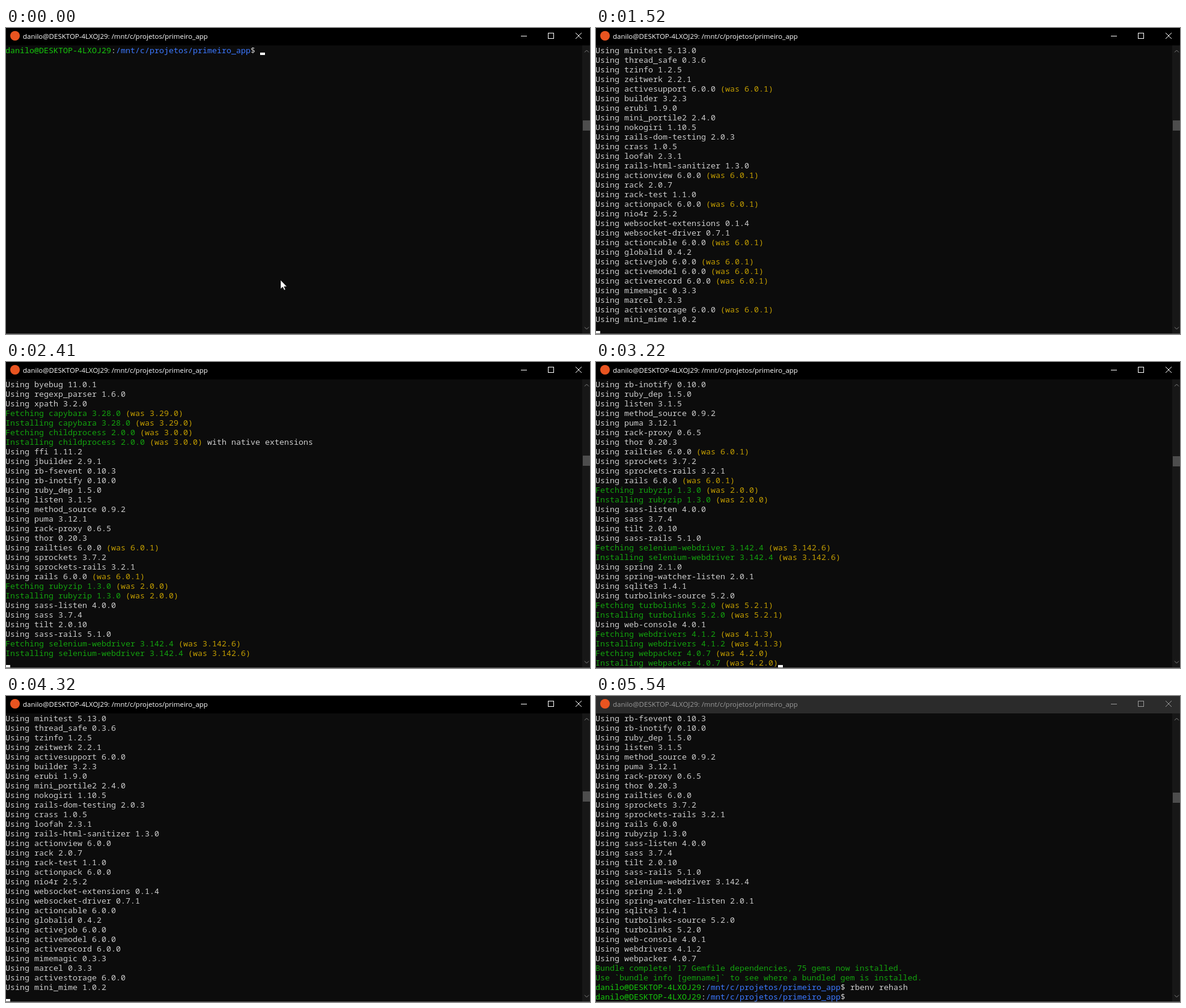
An HTML page with a canvas for the animation above (7630 ms loop, 972 by 510 pixels).

```html
<!DOCTYPE html>
<html lang="pt">
<head>
<meta charset="utf-8">
<title>Terminal</title>
<style>
html, body { margin: 0; width: 100%; height: 100%; overflow: hidden; background: #0c0c0c; }
canvas { display: block; }
</style>
</head>
<body>
<canvas id="stage" width="972" height="510"></canvas>
<script>
const ctx = document.getElementById('stage').getContext('2d', { alpha: false });
const LOOP = 7630, ROWS = 30, CELL_W = 8, CELL_H = 16, LEFT = -1, TOP = 29;
const LAST_STEP = 117;
const WHITE = '#cccccc', GREEN = '#13a10e', YELLOW = '#c19c00', LIME = '#16c60c', BLUE = '#3b78ff';
const HOST = 'danilo@DESKTOP-4LXOJ29', PATH = '/mnt/c/projetos/primeiro_app';

// name version [previous version] [+ when built natively]
const gems = `rake 13.0.1,concurrent-ruby 1.1.5,i18n 1.7.0,minitest 5.13.0,thread_safe 0.3.6,tzinfo 1.2.5,
zeitwerk 2.2.1,activesupport 6.0.0,builder 3.2.3,erubi 1.9.0,mini_portile2 2.4.0,nokogiri 1.10.5,
rails-dom-testing 2.0.3,crass 1.0.5,loofah 2.3.1,rails-html-sanitizer 1.3.0,actionview 6.0.0,rack 2.0.7,
rack-test 1.1.0,actionpack 6.0.0,nio4r 2.5.2,websocket-extensions 0.1.4,websocket-driver 0.7.1,
actioncable 6.0.0,globalid 0.4.2,activejob 6.0.0,activemodel 6.0.0,activerecord 6.0.0,mimemagic 0.3.3,
marcel 0.3.3,activestorage 6.0.0,mini_mime 1.0.2,mail 2.7.1,actionmailbox 6.0.0,actionmailer 6.0.0,
actiontext 6.0.0,public_suffix 4.0.1,addressable 2.7.0,bindex 0.8.1,msgpack 1.3.1,bootsnap 1.4.4 1.4.5 +,
bundler 2.0.2,byebug 11.0.1,regexp_parser 1.6.0,xpath 3.2.0,capybara 3.28.0 3.29.0,
childprocess 2.0.0 3.0.0 +,ffi 1.11.2,jbuilder 2.9.1,rb-fsevent 0.10.3,rb-inotify 0.10.0,ruby_dep 1.5.0,
listen 3.1.5,method_source 0.9.2,puma 3.12.1,rack-proxy 0.6.5,thor 0.20.3,railties 6.0.0,sprockets 3.7.2,
sprockets-rails 3.2.1,rails 6.0.0,rubyzip 1.3.0 2.0.0,sass-listen 4.0.0,sass 3.7.4,tilt 2.0.10,
sass-rails 5.1.0,selenium-webdriver 3.142.4 3.142.6,spring 2.1.0,spring-watcher-listen 2.0.1,
sqlite3 1.4.1,turbolinks-source 5.2.0,turbolinks 5.2.0 5.2.1,web-console 4.0.1,webdrivers 4.1.2 4.1.3,
webpacker 4.0.7 4.2.0`.split(/,\s*/).map(entry => entry.split(' '));

const prompt = command => [[LIME, HOST], [WHITE, ':'], [BLUE, PATH], [WHITE, '$ ' + command]];
const plain = (color, text) => [[color, text]];
const warning = [
  'The dependency tzinfo-data (>= 0) will be unused by any of the platforms Bundler is installing for. Bundler is installin',
  'g for ruby but the dependency is only for x86-mingw32, x86-mswin32, x64-mingw32, java. To add those platforms to the bun',
  'dle, run `bundle lock --add-platform x86-mingw32 x86-mswin32 x64-mingw32 java`.'
].map(text => plain(YELLOW, text));

function updateLines([name, version, previous, native]) {
  const was = v => [YELLOW, ` (was ${v})`];
  if (!previous) {
    const line = plain(WHITE, `Using ${name} ${version}`);
    return [version === '6.0.0' ? [...line, was('6.0.1')] : line];
  }
  const line = verb => [[GREEN, `${verb} ${name} ${version}`], was(previous)];
  const install = line('Installing');
  if (native) install.push([WHITE, ' with native extensions']);
  return [line('Fetching'), install];
}

const lines = [];
const metadata = 'Fetching gem metadata from https://rubygems.org/';
lines.push(prompt('bundle update'), ...warning,
  plain(WHITE, metadata + '.'.repeat(14)), plain(WHITE, metadata + '.'),
  plain(WHITE, 'Resolving dependencies.....'));
const update = lines.length;
lines.push(...gems.flatMap(updateLines), plain(GREEN, 'Bundle updated!'));
const second = lines.length;
lines.push(prompt('bundle install'), ...warning);
const install = lines.length;
lines.push(...gems.map(([name, version]) => plain(WHITE, `Using ${name} ${version}`)),
  plain(GREEN, 'Bundle complete! 17 Gemfile dependencies, 75 gems now installed.'),
  plain(GREEN, 'Use `bundle info [gemname]` to see where a bundled gem is installed.'));
const third = lines.length;
lines.push(prompt('rbenv rehash'), prompt(''));

// step, line, column of the terminal cursor
const keys = [
  [0, 0, 53], [13, 0, 66], [14, 1, 0], [15, 4, 0], [16, 4, 50], [20, 4, 62],
  [21, 5, 49], [22, 6, 0], [23, 6, 23], [27, 6, 27],
  [28, update, 0], [33, update + 40, 0], [34, update + 41, 0], [35, update + 41, 37], [37, update + 41, 37],
  [38, update + 46, 0], [39, update + 48, 0], [51, update + 72, 0], [67, update + 81, 0],
  [68, second - 2, 38], [69, second - 1, 0], [71, second, 0], [72, second, 53], [86, second, 67],
  [87, second + 1, 0], [88, install, 0], [91, install + 32, 0],
  [95, third, 53], [99, third, 53], [111, third, 65],
  [112, third + 1, 0], [115, third + 1, 0], [116, third + 1, 53]
];
const clock = [[0, 0], [1, 50], [18, 830], [34, 1620], [51, 2410], [68, 3220], [84, 3990], [101, 4770], [LAST_STEP, 5540]];

function stepAt(time) {
  const next = clock.findIndex(([, start]) => start > time);
  if (next < 0) return LAST_STEP;
  const [a, ta] = clock[next - 1], [b, tb] = clock[next];
  return Math.floor(a + (b - a) * (time - ta) / (tb - ta) + 0.08);
}

function cursorAt(step) {
  const next = keys.findIndex(key => key[0] > step);
  if (next < 0) return keys[keys.length - 1].slice(1);
  const [sa, la, ca] = keys[next - 1], [sb, lb, cb] = keys[next];
  const u = (step - sa) / (sb - sa);
  if (u === 0) return [la, ca];
  return la === lb ? [la, Math.round(ca + (cb - ca) * u)] : [Math.floor(la + (lb - la) * u), 0];
}

// An idle cursor blinks on every other step.
function cursorShown(step) {
  if (step === 0) return true;
  const moved = String(cursorAt(step)) !== String(cursorAt(step - 1));
  return moved || !cursorShown(step - 1);
}

function rect(color, x, y, w, h) {
  ctx.fillStyle = color;
  ctx.fillRect(x, y, w, h);
}

function stroke(color, ...paths) {
  ctx.strokeStyle = color;
  ctx.lineWidth = 1;
  ctx.beginPath();
  for (const path of paths) path.forEach(([x, y], i) => i ? ctx.lineTo(x, y) : ctx.moveTo(x, y));
  ctx.stroke();
}

function drawTitleBar(active) {
  const color = active ? '#ffffff' : '#999999';
  rect(active ? '#000000' : '#2b2b2b', 0, 0, 972, TOP);
  ctx.fillStyle = '#e95420';
  ctx.beginPath();
  ctx.arc(15, 13, 8, 0, Math.PI * 2);
  ctx.fill();
  ctx.font = '11.5px "Open Sans", sans-serif';
  ctx.fillStyle = color;
  ctx.fillText(`${HOST}: ${PATH}`, 28, 18);
  rect(color, 857, 13, 10, 1);
  ctx.strokeStyle = color;
  ctx.lineWidth = 1;
  ctx.strokeRect(902.5, 8.5, 9, 9);
  stroke(color, [[948, 8], [958, 18]], [[958, 8], [948, 18]]);
}

function drawScrollbar(top) {
  rect('#171717', 959, TOP, 13, 480);
  rect('#4d4d4d', 960, Math.round(153.7 + top * 0.05), 12, 17);
  ctx.lineWidth = 1;
  stroke('#808080', [[963, 40.5], [966.5, 37], [970, 40.5]], [[963, 498.5], [966.5, 502], [970, 498.5]]);
}

function drawLine(segments, y, limit) {
  let column = 0;
  for (const [color, text] of segments) {
    ctx.fillStyle = color;
    ctx.fillText(text.slice(0, Math.max(0, limit - column)), LEFT + column * CELL_W, y);
    column += text.length;
  }
}

function drawPointer(x, y) {
  const outline = [[0, 0], [0, 15], [3.5, 11.8], [6, 17], [8.2, 16], [5.8, 11], [10.5, 11]];
  ctx.beginPath();
  outline.forEach(([dx, dy]) => ctx.lineTo(x + dx, y + dy));
  ctx.closePath();
  ctx.fillStyle = '#ffffff';
  ctx.fill();
  ctx.strokeStyle = '#000000';
  ctx.lineWidth = 0.6;
  ctx.stroke();
}

function draw(time) {
  const step = stepAt(time);
  const [line, column] = cursorAt(step);
  const top = Math.max(0, line - ROWS + 1);

  rect('#0c0c0c', 0, 0, 972, 510);
  ctx.font = `${CELL_W / 0.6}px "Noto Sans Mono", "Liberation Mono", monospace`;
  for (let i = top; i <= line; i++) {
    drawLine(lines[i], TOP + (i - top) * CELL_H + 13, i < line ? Infinity : column);
  }
  if (cursorShown(step)) {
    rect('#ffffff', LEFT + column * CELL_W, TOP + (line - top) * CELL_H + 12, CELL_W, 4);
  }
  drawScrollbar(top);
  rect('#555555', 0, 509, 972, 1);
  drawTitleBar(step < LAST_STEP);
  if (step < 18) drawPointer(457, 420);
}

const start = performance.now();
function tick() {
  draw((performance.now() - start) % LOOP);
  requestAnimationFrame(tick);
}
tick();
</script>
</body>
</html>
```
